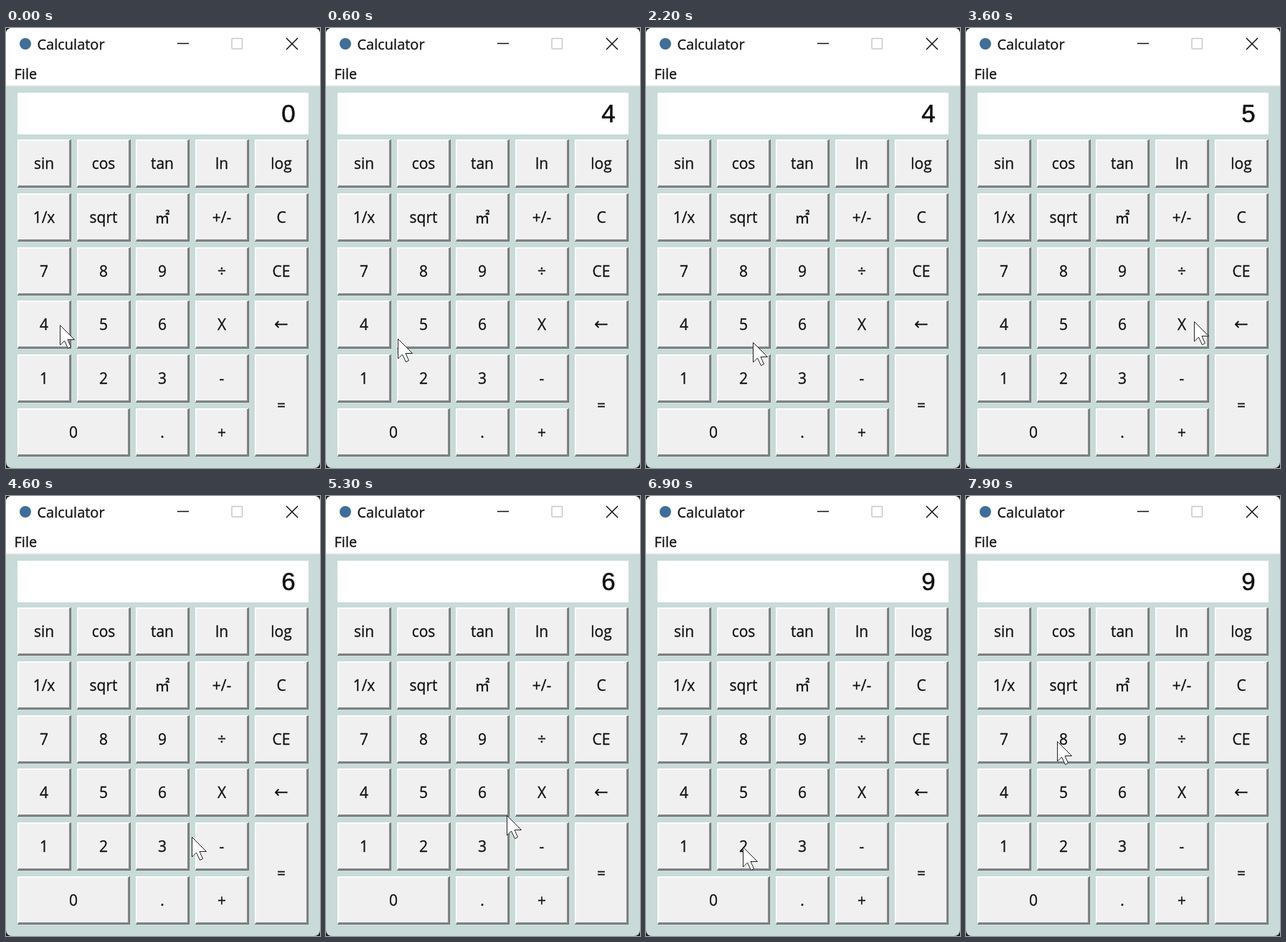
Animation of 438 by 612 pixels, one loop 8 s. Source, as an HTML page:

```html
<!DOCTYPE html>
<html lang="en">
<head>
<meta charset="utf-8">
<title>Calculator</title>
<style>
  html, body { margin: 0; width: 100%; height: 100%; overflow: hidden; background: #202222; }
  svg { display: block; width: 100vw; height: 100vh; }
  text { font-family: "Open Sans", "Noto Sans", sans-serif; fill: #111; stroke: #111; stroke-width: .3; }
  #keys text { font-size: 21px; text-anchor: middle; }
  #keys .cjk { font-family: "Noto Sans CJK SC", "Noto Sans CJK JP", "Noto Sans CJK", sans-serif; }
  #keys .arrow { font-family: "DejaVu Sans", sans-serif; font-size: 24px; stroke: none; }
  #display { font: 35px "Liberation Sans", Arial, sans-serif; text-anchor: middle; stroke-width: .5; }
</style>
</head>
<body>
<svg viewBox="0 0 438 612">
  <clipPath id="window"><rect width="438" height="612" rx="8"/></clipPath>
  <rect width="438" height="612" fill="#202222"/>
  <g clip-path="url(#window)">
    <rect width="438" height="612" fill="#c8dbd8"/>
    <rect width="438" height="80" fill="#fff"/>
    <rect y="79" width="438" height="2" fill="#efefef"/>
  </g>
  <circle cx="27" cy="22" r="8" fill="#3f6f98"/>
  <text x="43.5" y="30" font-size="20">Calculator</text>
  <text x="11.5" y="71" font-size="20">File</text>
  <g fill="none" stroke="#111" stroke-width="1.5">
    <path d="M239 21.5h16M391 14l16 16M407 14l-16 16"/>
    <rect x="315" y="14.5" width="14.5" height="14.5" rx="1" stroke="#c8c8c8"/>
  </g>
  <rect x="16" y="90" width="406" height="58" fill="#fff"/>
  <text id="display" x="394" y="131">0</text>
  <g id="keys"></g>
  <path id="cursor" d="M.5.5V28l6-6 5 10.500 4-2-4.500-10h9.500Z" fill="#fff" stroke="#222"/>
</svg>
<script>
const LOOP = 8000, STEP = 100, PAUSE = 400;
const LEFT = 16, TOP = 155, COLUMN = 82.7, ROW = 74.8, GAP = 8;
const keys = document.getElementById("keys");
const display = document.getElementById("display");
const cursor = document.getElementById("cursor");

function addNode(name, attrs, text = "") {
  const node = document.createElementNS("http://www.w3.org/2000/svg", name);
  for (const key in attrs) node.setAttribute(key, attrs[key]);
  node.textContent = text;
  keys.append(node);
}

function addKey(label, column, row, columns = 1, rows = 1) {
  const x = Math.round(LEFT + column * COLUMN);
  const y = Math.round(TOP + row * ROW);
  const width = Math.round(columns * COLUMN - GAP);
  const height = Math.round(rows * ROW - GAP);
  const face = (near, far, fill) => addNode("rect", {
    x: x + near, y: y + near, width: width - near - far, height: height - near - far, fill
  });
  face(0, 0, "#6c6e6e");
  face(0, 1, "#fff");
  face(1, 1, "#858787");
  face(1, 3, "#fafafa");
  face(2, 3, "#f0f0f0");
  const style = { "㎡": "cjk", "←": "arrow" }[label] || "";
  addNode("text", { x: x + (width - 1) / 2, y: y + height / 2 + 7, class: style }, label);
}

const layout = [
  "sin cos tan ln log",
  "1/x sqrt ㎡ +/- C",
  "7 8 9 ÷ CE",
  "4 5 6 X ←",
  "1 2 3 -"
];
layout.forEach((line, row) => line.split(" ").forEach((label, column) => addKey(label, column, row)));
addKey("0", 0, 5, 2);
addKey(".", 2, 5);
addKey("+", 3, 5);
addKey("=", 4, 4, 1, 2);

// The pointer rests at each stop, then glides on; a digit key shows as it leaves.
const stops = [
  { time: 0, x: 75, y: 413, digit: "4" },
  { time: 1300, x: 272, y: 564 },
  { time: 2200, x: 149, y: 437, digit: "5" },
  { time: 3600, x: 318, y: 408 },
  { time: 4600, x: 259, y: 474 },
  { time: 6000, x: 226, y: 337, digit: "9" },
  { time: 6900, x: 135, y: 488 },
  { time: 7900, x: 127, y: 341 }
];
stops.splice(4, 0, { time: 4050, x: 230, y: 425, digit: "6" });

function pointerAt(time) {
  const index = stops.findLastIndex(stop => stop.time <= time);
  const from = stops[index], to = stops[index + 1] || from;
  const span = to.time - from.time;
  const rest = Math.min(PAUSE, span / 2);
  const u = span ? Math.max(0, (time - from.time - rest) / (span - rest)) : 0;
  const eased = u * u * (3 - 2 * u);
  return [from.x + (to.x - from.x) * eased, from.y + (to.y - from.y) * eased];
}

function render(time) {
  const [x, y] = pointerAt(time);
  cursor.setAttribute("transform", `translate(${Math.round(x)} ${Math.round(y)})`);
  const typed = stops.findLast(stop => stop.digit && stop.time + PAUSE <= time);
  display.textContent = typed ? typed.digit : "0";
}

const start = performance.now();
function tick() {
  const elapsed = (performance.now() - start) % LOOP;
  render(Math.floor(elapsed / STEP) * STEP);
  requestAnimationFrame(tick);
}
tick();
</script>
</body>
</html>
```
